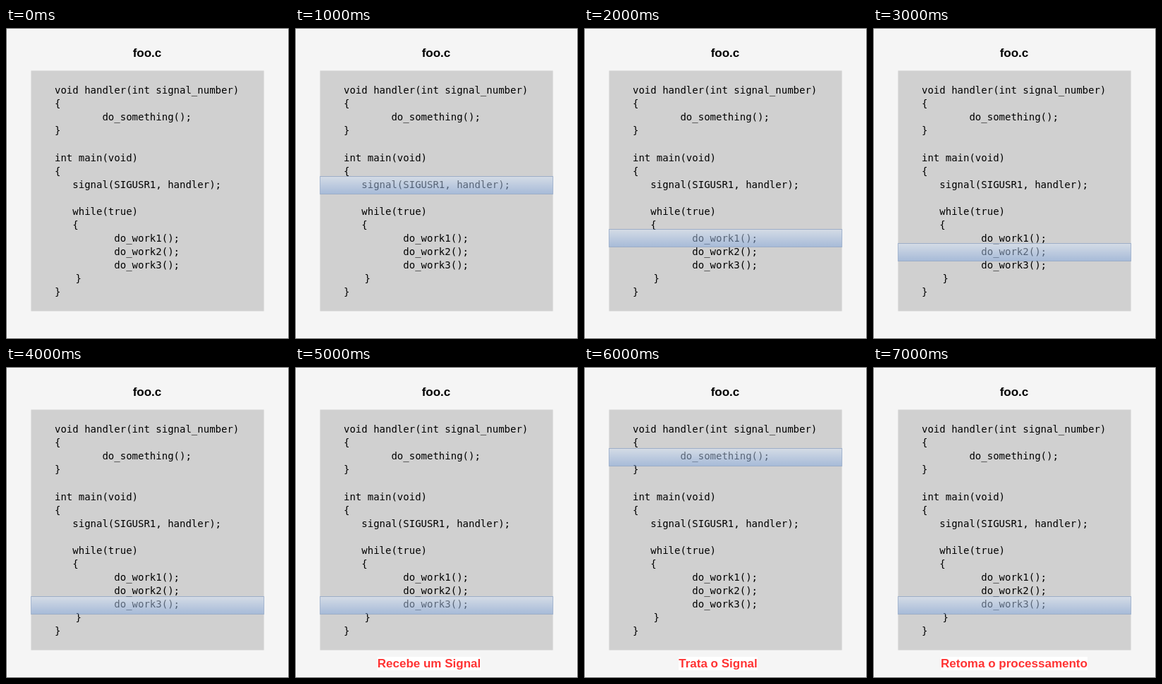
These frames come from a looping animation (401x441 px, 8000 ms). An HTML page:

```html
<!DOCTYPE html>
<html lang="pt">
<head>
<meta charset="utf-8">
<title>foo.c</title>
<style>
  html, body { margin: 0; width: 100%; height: 100%; overflow: hidden; background: #f5f5f5; }
  svg { display: block; }
  .bold { font: bold 17px "Liberation Sans", Arial, sans-serif; text-anchor: middle; }
  #code { font: 14px "DejaVu Sans Mono", monospace; }
</style>
</head>
<body>
<svg width="401" height="441" viewBox="0 0 401 441">
  <defs>
    <linearGradient id="blue" x1="0" y1="0" x2="0" y2="1">
      <stop offset="0" stop-color="#dae8fc"/>
      <stop offset="1" stop-color="#7ea6e0"/>
    </linearGradient>
  </defs>
  <rect x="0.5" y="0.5" width="400" height="440" fill="#f5f5f5" stroke="#666"/>
  <rect x="35.5" y="60.5" width="330" height="341" fill="#d0d0d0"/>
  <text class="bold" x="200" y="41">foo.c</text>
  <g id="code"></g>
  <rect id="bar" x="35.5" width="330" height="25" fill="url(#blue)" stroke="#6c8ebf" opacity="0.5"/>
  <g id="label">
    <rect id="back" y="411" height="19" fill="#fff"/>
    <text id="note" class="bold" y="426" fill="#f33"></text>
  </g>
</svg>
<script>
const $ = id => document.getElementById(id);
const COL = 8.43;

// [row, column, text]
const lines = [
  [0, 0, "void handler(int signal_number)"],
  [1, 0, "{"],
  [2, 8, "do_something();"],
  [3, 0, "}"],
  [5, 0, "int main(void)"],
  [6, 0, "{"],
  [7, 3, "signal(SIGUSR1, handler);"],
  [9, 3, "while(true)"],
  [10, 3, "{"],
  [11, 10, "do_work1();"],
  [12, 10, "do_work2();"],
  [13, 10, "do_work3();"],
  [14, 3.5, "}"],
  [15, 0, "}"]
];

for (const [row, col, str] of lines) {
  const el = document.createElementNS("http://www.w3.org/2000/svg", "text");
  el.setAttribute("x", 69 + col * COL);
  el.setAttribute("y", 93 + row * 19 + (row > 4 ? 1 : 0));
  el.textContent = str;
  $("code").append(el);
}

// One step per second: bar top, label, label centre
const steps = [
  {},
  { bar: 210 },
  { bar: 285 },
  { bar: 305 },
  { bar: 325 },
  { bar: 325, note: "Recebe um Signal", cx: 190 },
  { bar: 115, note: "Trata o Signal", cx: 190 },
  { bar: 325, note: "Retoma o processamento", cx: 200 }
];
let shown = -1;

function draw(ms) {
  const i = Math.floor(ms / 1000) % steps.length;
  if (i === shown) return;
  shown = i;
  const { bar, note, cx } = steps[i];
  $("bar").style.display = bar ? "" : "none";
  if (bar) $("bar").setAttribute("y", bar + 0.5);
  $("label").style.display = note ? "" : "none";
  if (note) {
    $("note").textContent = note;
    $("note").setAttribute("x", cx);
    const w = $("note").getComputedTextLength();
    $("back").setAttribute("x", cx - w / 2);
    $("back").setAttribute("width", w);
  }
}

const start = performance.now();
function tick() {
  draw(performance.now() - start);
  requestAnimationFrame(tick);
}
tick();
</script>
</body>
</html>
```
